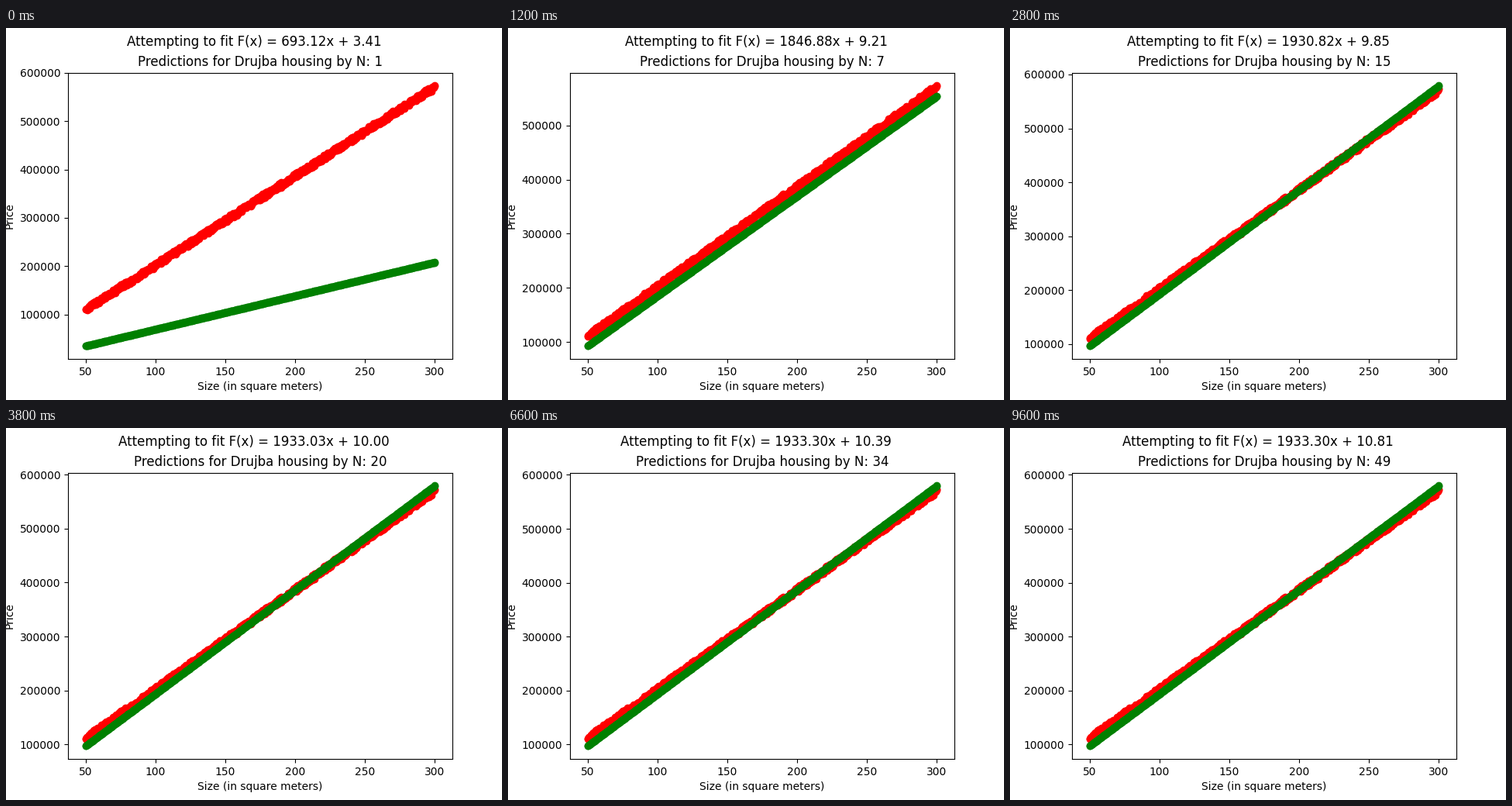
A matplotlib script for the animation above (9.8 s loop, 640 px wide and 480 px high).

```python
import numpy as np
import matplotlib.pyplot as plt
from matplotlib.animation import FuncAnimation

STEPS = 49
INTERVAL = 200
POINTS = 600

# Gradient descent converges geometrically; the bias keeps a slow drift.
SLOPE_LIMIT = 1933.2995
DECAY = 1 - 693.12 / SLOPE_LIMIT
BIAS_LIMIT = 9.438
BIAS_DRIFT = 0.028

TOP_PRICE = 573400


def make_prices(sizes):
    """Linear prices with bounded noise, capped at the highest price."""
    rng = np.random.default_rng(4)
    noise = rng.uniform(-5000, 5000, sizes.size)
    # The smallest homes stay close to the line.
    noise = np.clip(noise, -1000 - 1500 * (sizes - 50), 1500 * (sizes - 50))
    return np.minimum(1846 * sizes + 17700 + noise, TOP_PRICE)


def fit(n):
    rest = DECAY ** n
    slope = SLOPE_LIMIT * (1 - rest)
    bias = BIAS_LIMIT * (1 - rest) + BIAS_DRIFT * n
    return slope, bias


sizes = np.linspace(50, 300, POINTS)
prices = make_prices(sizes)

fig, ax = plt.subplots(figsize=(6.4, 4.8), dpi=100)
heading = fig.suptitle("", y=0.982)


def draw(i):
    n = i + 1
    slope, bias = fit(n)
    ax.clear()
    ax.scatter(sizes, prices, color="red")
    ax.scatter(sizes, slope * sizes + bias, color="green")
    ax.set_xlabel("Size (in square meters)")
    ax.set_ylabel("Price")
    ax.set_title(f"Predictions for Drujba housing by N: {n}")
    heading.set_text(f"Attempting to fit F(x) = {slope:.2f}x + {bias:.2f}")


anim = FuncAnimation(fig, draw, frames=STEPS, interval=INTERVAL,
                     repeat=True, repeat_delay=0)
plt.show()
```
